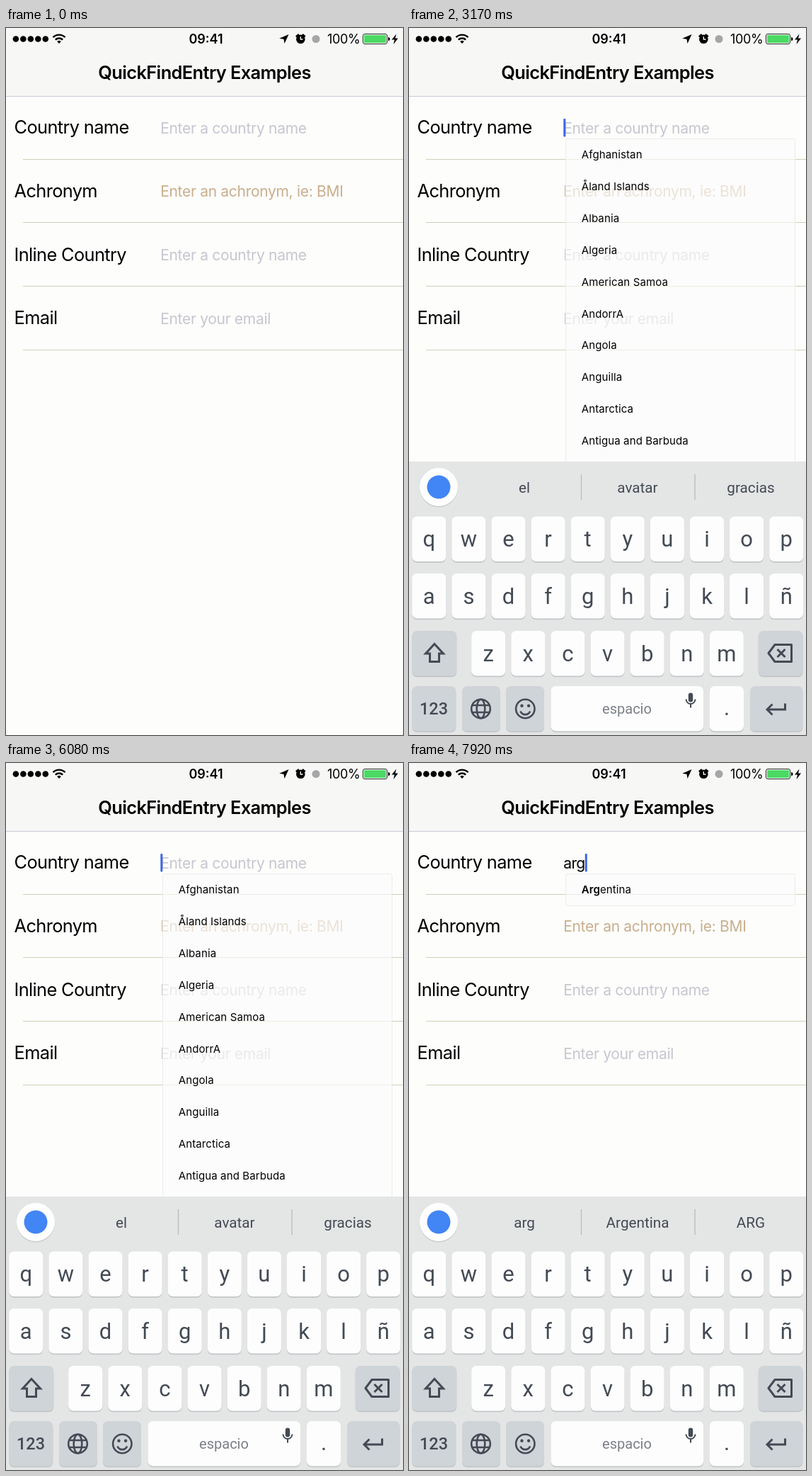
These frames come from a looping animation (561x998 px, 8000 ms). An HTML page:

```html
<!DOCTYPE html>
<html lang="en">
<head>
<meta charset="utf-8">
<title>Search field demo</title>
<style>
  html, body { margin: 0; width: 100%; height: 100%; overflow: hidden; background: #fdfdfc; }
  svg { display: block; width: 100%; height: 100%; }
  text { font-family: Inter, sans-serif; white-space: pre; }
  .status { font-size: 18px; }
  .title { font-size: 25.4px; font-weight: 600; letter-spacing: -.6px; }
  .label { font-size: 25.4px; letter-spacing: -.65px; }
  .field { font-size: 21px; letter-spacing: -.3px; }
  #typed { letter-spacing: -.6px; }
  .item { font-size: 15px; letter-spacing: .12px; }
  .item tspan { font-weight: 600; }
  .mid { text-anchor: middle; }
  #keyboard text { font-family: Roboto, sans-serif; text-anchor: middle; fill: #434a54; }
  #keyboard .letter { font-size: 31px; }
  #keyboard .word { font-size: 20.7px; }
  .icon { fill: none; stroke: #434a54; stroke-width: 3; }
</style>
</head>
<body>
<svg viewBox="0 0 561 998">
  <rect width="561" height="998" fill="#fdfdfc"/>
  <rect width="561" height="96" fill="#f7f7f6"/>
  <rect y="96" width="561" height="1" fill="#cbcbd8"/>

  <g id="dots"></g>
  <g fill="none" stroke="#000" stroke-width="2.4">
    <path d="M66.5 13.2a12 12 0 0 1 17 0M69.8 16.7a7.4 7.4 0 0 1 10.4 0"/>
    <path d="M75 22l-2.8-3a4 4 0 0 1 5.6 0z" fill="#000" stroke="none"/>
  </g>
  <text class="status mid" x="282.5" y="22" font-weight="600">09:41</text>
  <path d="M399.5 9l-6 13-1-6.2-6.3-1z"/>
  <circle cx="416.3" cy="15.8" r="6.3"/>
  <path d="M409.8 12.2l4-3.2M422.8 12.2l-4-3.2" stroke="#000" stroke-width="2.4"/>
  <path d="M416.3 12v4h3.2" fill="none" stroke="#f7f7f6" stroke-width="1.4"/>
  <circle cx="438" cy="15.5" r="5.5" fill="#a6a6a8"/>
  <text class="status" x="500.5" y="22" text-anchor="end" letter-spacing="-.3">100%</text>
  <rect x="504.5" y="8.5" width="34" height="14" rx="2.5" fill="#fff" stroke="#222"/>
  <rect x="506" y="10" width="31" height="11" rx="1" fill="#4cd964"/>
  <path d="M540 13a2.5 2.5 0 0 1 0 5z"/>
  <path d="M551.5 8.5l-6.5 8h4l-1.5 6.5 6.5-8.5h-4z"/>
  <text class="title mid" x="280.5" y="71.5">QuickFindEntry Examples</text>

  <g id="form"></g>
  <text id="typed" class="field" x="218.2" y="148.5"></text>
  <rect id="caret" y="128" width="3" height="25.5" rx="1" fill="#3d66e8"/>
  <g id="popover">
    <rect id="panel" x="221.5" y="156.5" width="324" rx="3" fill="#fdfdfd" fill-opacity=".67" stroke="#ebebe9"/>
    <g id="list"></g>
  </g>

  <g id="keyboard">
    <rect y="612" width="561" height="387" fill="#e4e5e5"/>
    <circle cx="42" cy="649.5" r="27" fill="#c9cbcd"/>
    <circle cx="42" cy="648" r="27" fill="#fefefe"/>
    <circle cx="42" cy="648" r="16.5" fill="#4285f4"/>
    <path d="M243.5 630v36M404 630v36" stroke="#b9bbbe" stroke-width="1.3"/>
    <g id="words"></g>
    <g id="keys"></g>
    <g class="icon">
      <path d="M36 869.5l12.5 13.5h-6v11.5h-13v-11.5h-6z"/>
      <path d="M517 870.5h23.5v24h-23.5l-9-12zM520.5 877l11 11M531.5 877l-11 11" stroke-linejoin="round"/>
      <g stroke-width="2.6">
        <circle cx="101.5" cy="961" r="13.3"/>
        <ellipse cx="101.5" cy="961" rx="5.8" ry="13.3"/>
        <path d="M89.500 956h24M89.500 966h24"/>
        <circle cx="164.300" cy="961" r="13.200"/>
        <path d="M157.500 964.500a7.300 7.300 0 0 0 13.600 0"/>
      </g>
      <path d="M531.500 953.500v8.500h-25M513.500 954.500l-7.500 7.500 7.500 7.500"/>
      <path d="M391.500 947.500a6.500 6.500 0 0 0 13 0M398 954v5.500" stroke-width="2"/>
    </g>
    <g fill="#434a54">
      <circle cx="159.500" cy="956.800" r="2.200"/>
      <circle cx="169.100" cy="956.800" r="2.200"/>
      <rect x="394.800" y="938.500" width="6.400" height="13" rx="3.200"/>
    </g>
  </g>
</svg>
<script>
const LOOP = 8000, ROW = 44.9, FOCUS = 2650;
const SLIDE = { start: 2890, length: 270, travel: 387 };
const BLINK = { start: 3470, period: 870, fade: 175 };
const SHORT_PANEL = 408.5, TALL_PANEL = 490;

const START_LIST = ['Afghanistan', 'Åland Islands', 'Albania', 'Algeria', 'American Samoa',
  'AndorrA', 'Angola', 'Anguilla', 'Antarctica', 'Antigua and Barbuda'];
const AR_LIST = ['Antarctica', 'Antigua and Barbuda', 'Argentina', 'Armenia', 'Aruba',
  'Barbados', 'Belarus', 'Brunei Darussalam', 'Bulgaria', 'Denmark'];
const IDLE_WORDS = ['el', 'avatar', 'gracias'];

const steps = [
  { at: 0, typed: '', words: IDLE_WORDS, list: [], height: 0 },
  { at: FOCUS, typed: '', words: IDLE_WORDS, list: START_LIST.slice(0, 9), height: SHORT_PANEL },
  { at: 2960, typed: '', words: IDLE_WORDS, list: START_LIST, height: TALL_PANEL },
  { at: 6100, typed: 'a', words: ['a', 'al', 'así'], list: START_LIST, height: TALL_PANEL },
  { at: 6380, typed: 'ar', words: ['ar', 'se', 'array'], list: AR_LIST, height: TALL_PANEL },
  { at: 7760, typed: 'arg', words: ['arg', 'Argentina', 'ARG'], list: ['Argentina'], height: ROW }
];

const $ = id => document.getElementById(id);
const label = (cls, x, y, content, extra = '') =>
  `<text class="${cls}" x="${x}" y="${y}" ${extra}>${content}</text>`;

$('dots').innerHTML = [0, 1, 2, 3, 4]
  .map(i => `<circle cx="${13.9 + 10.47 * i}" cy="15.5" r="4.3"/>`).join('');

const fields = [
  ['Country name', 'Enter a country name'],
  ['Achronym', 'Enter an achronym, ie: BMI', '#c9ae8c'],
  ['Inline Country', 'Enter a country name'],
  ['Email', 'Enter your email']
];
$('form').innerHTML = fields.map(([name, hint, color = '#c6c6d0'], i) => {
  const y = 89.8 * i;
  return label('label', 11.6, 149 + y, name) +
    label('field hint', 218.2, 148.5 + y, hint, `fill="${color}"`) +
    `<rect x="24" y="${Math.round(184.6 + y)}" width="537" height="1" fill="#d0d0b8"/>`;
}).join('');
const firstHint = document.querySelector('.hint');

function key(x, y, width, fill = '#fdfdfd') {
  const box = (top, color) =>
    `<rect x="${x}" y="${top}" width="${width}" height="63.5" rx="7" fill="${color}"/>`;
  return box(y + 1.8, '#c3c6c9') + box(y, fill);
}
const letterRow = (letters, x, y) => [...letters].map((c, i) => {
  const left = x + 56.1 * i;
  return key(left, y, 48) + label('letter', left + 24, y + 42.5, c);
}).join('');
const GRAY = '#cfd4d8';
$('keys').innerHTML =
  letterRow('qwertyuiop', 4.3, 689.5) +
  letterRow('asdfghjklñ', 4.3, 770) +
  letterRow('zxcvbnm', 88.2, 851) +
  [[4.3, 851, 63], [493.7, 851, 63], [4.3, 929, 62], [75, 929, 54], [137, 929, 54], [482, 929, 74.5]]
    .map(box => key(...box, GRAY)).join('') +
  key(200.5, 929, 215.5) + key(425, 929, 48) +
  label('', 35, 969, '123', 'font-size="23.5" font-weight="500"') +
  label('', 308, 968, 'espacio', 'font-size="20" style="fill:#7b8087"') +
  label('letter', 449, 969.5, '.');

function highlight(name, part) {
  const at = part ? name.toLowerCase().indexOf(part) : -1;
  if (at < 0) return name;
  const end = at + part.length;
  return `${name.slice(0, at)}<tspan>${name.slice(at, end)}</tspan>${name.slice(end)}`;
}

let shown;
function show(step) {
  if (step === shown) return;
  shown = step;
  const { typed, words, list, height } = step;
  $('typed').textContent = typed;
  firstHint.style.display = typed ? 'none' : '';
  $('popover').style.display = list.length ? '' : 'none';
  $('panel').setAttribute('height', height);
  $('list').innerHTML = list
    .map((name, i) => label('item', 243.7, 184 + ROW * i, highlight(name, typed))).join('');
  $('words').innerHTML = words
    .map((word, i) => label('word', 163 + 160 * i, 656, word)).join('');
}

const clamp = v => Math.min(1, Math.max(0, v));
const smooth = v => v * v * (3 - 2 * v);

function caretOpacity(t, typed) {
  if (t < FOCUS) return 0;
  if (typed || t < BLINK.start) return 1;
  const phase = (t - BLINK.start) % BLINK.period;
  return smooth(clamp(Math.abs(phase - BLINK.fade) / BLINK.fade));
}

function draw(t) {
  const step = steps.findLast(s => t >= s.at);
  show(step);
  const typedWidth = step.typed ? $('typed').getComputedTextLength() : 0;
  $('caret').setAttribute('x', 218.3 + typedWidth);
  $('caret').setAttribute('opacity', caretOpacity(t, step.typed));
  const rest = (1 - clamp((t - SLIDE.start) / SLIDE.length)) ** 3;
  $('keyboard').setAttribute('transform', `translate(0 ${SLIDE.travel * rest})`);
}

const begin = performance.now();
function tick() {
  draw((performance.now() - begin) % LOOP);
  requestAnimationFrame(tick);
}
tick();
</script>
</body>
</html>
```
